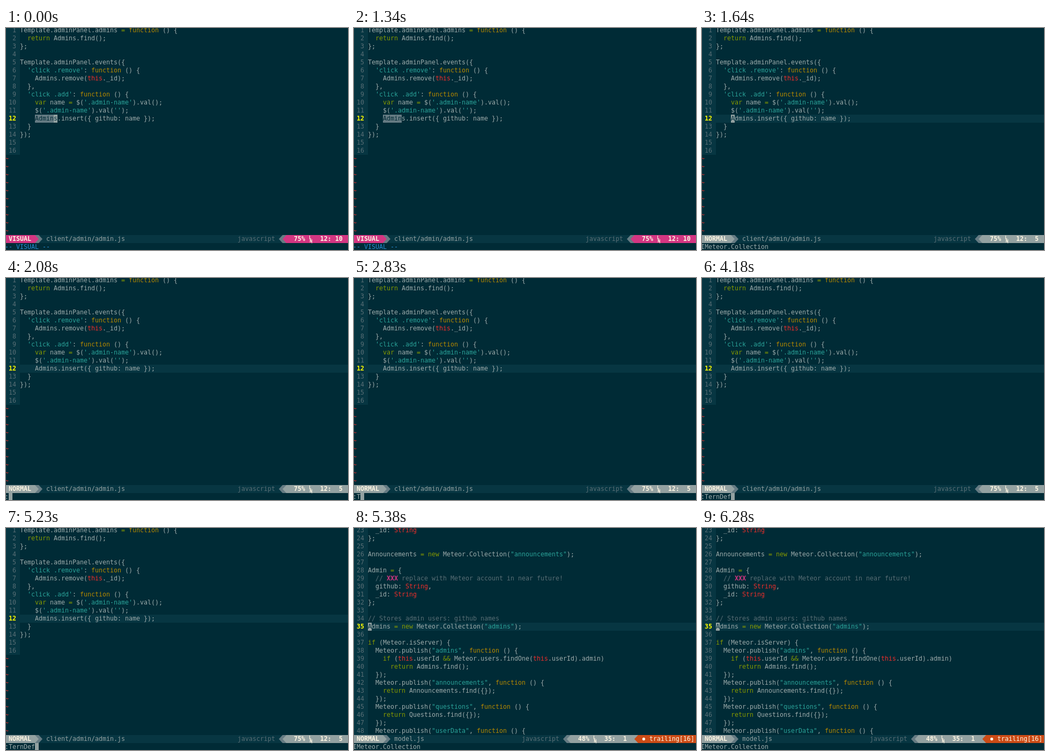
An HTML page with a canvas for the animation above (8.1 s loop, 638 px wide and 415 px high).

```html
<!DOCTYPE html>
<html lang="en">
<head>
<meta charset="utf-8">
<title>Jump to definition</title>
<style>
  html, body { margin: 0; width: 100%; height: 100%; overflow: hidden; background: #002b36; }
  canvas { display: block; }
</style>
</head>
<body>
<canvas id="stage" width="638" height="415"></canvas>
<script>
const ctx = document.getElementById('stage').getContext('2d');

const LOOP = 8100, WIDTH = 638;
const CELL_W = 7, CELL_H = 15, LEFT = -2, TOP = -3, BASELINE = 11;
const GUTTER = 4, STATUS_ROW = 26, COMMAND_ROW = 27;

const C = {
  bg: '#002b36', panel: '#073642', dim: '#586e75', mid: '#657b83', text: '#9dabab',
  light: '#93a1a1', white: '#fdf6e3', yellow: '#b58900', orange: '#cb4b16', red: '#ee2e2b',
  magenta: '#d33682', blue: '#268bd2', cyan: '#2aa198', green: '#859900', current: '#ffff00'
};

const adminFile = {
  name: 'client/admin/admin.js', first: 1, current: 12, percent: '75%', statusCol: 62,
  lines: `Template.adminPanel.admins = function () {
  return Admins.find();
};

Template.adminPanel.events({
  'click .remove': function () {
    Admins.remove(this._id);
  },
  'click .add': function () {
    var name = $('.admin-name').val();
    $('.admin-name').val('');
    Admins.insert({ github: name });
  }
});

`.split('\n')
};

const modelFile = {
  name: 'model.js', first: 23, current: 35, percent: '48%', statusCol: 45, warning: 'trailing[16]',
  lines: `  _id: String
};

Announcements = new Meteor.Collection("announcements");

Admin = {
  // XXX replace with Meteor account in near future!
  github: String,
  _id: String
};

// Stores admin users: github names
Admins = new Meteor.Collection("admins");

if (Meteor.isServer) {
  Meteor.publish("admins", function () {
    if (this.userId && Meteor.users.findOne(this.userId).admin)
      return Admins.find();
  });
  Meteor.publish("announcements", function () {
    return Announcements.find({});
  });
  Meteor.publish("questions", function () {
    return Questions.find({});
  });
  Meteor.publish("userData", function () {`.split('\n')
};

const TOKENS = /\bXXX\b|\/\/ ?|'[^']*'|"[^"]*"|\b(?:function|this|String|var|return|new|if)\b|&&|=|[^\s]/g;

const cellX = col => LEFT + col * CELL_W;
const cellY = row => TOP + row * CELL_H;

function fillCells(col, row, count, color) {
  ctx.fillStyle = color;
  ctx.fillRect(cellX(col), cellY(row), count * CELL_W, CELL_H);
}

function fillRow(col, row, color) {
  ctx.fillStyle = color;
  ctx.fillRect(cellX(col), cellY(row), WIDTH - cellX(col), CELL_H);
}

function write(text, col, row, color, bold = false) {
  ctx.font = `${bold ? 'bold ' : ''}11.63px "DejaVu Sans Mono", monospace`;
  ctx.fillStyle = color;
  [...text].forEach((char, i) => {
    if (char !== ' ') ctx.fillText(char, cellX(col + i), cellY(row) + BASELINE);
  });
}

function drawCursor(col, row, char = ' ') {
  fillCells(col, row, 1, C.light);
  write(char, col, row, C.panel);
}

function tokenColor(token) {
  if (/^['"]/.test(token)) return C.cyan;
  if (token === 'function') return C.yellow;
  if (/^(this|String)$/.test(token)) return C.red;
  if (/^(var|return|new|if|&&|=)$/.test(token)) return C.green;
  return C.text;
}

function drawCode(line, row) {
  const isComment = line.trim().startsWith('//');
  if (isComment) {
    write(line.replace('XXX', '   '), GUTTER, row, C.dim);
    const mark = line.indexOf('XXX');
    if (mark >= 0) write('XXX', GUTTER + mark, row, C.magenta, true);
    return;
  }
  for (const match of line.matchAll(TOKENS))
    write(match[0], GUTTER + match.index, row, tokenColor(match[0]));
}

function drawFile(file, highlightLine) {
  file.lines.forEach((line, row) => {
    const number = file.first + row, isCurrent = number === file.current;
    fillCells(0, row, GUTTER, C.panel);
    if (isCurrent && highlightLine) fillRow(GUTTER, row, C.panel);
    write(String(number).padStart(3), 0, row, isCurrent ? C.current : C.dim, isCurrent);
    drawCode(line, row);
  });
  for (let row = file.lines.length; row < STATUS_ROW; row++) write('~', 0, row, C.red);
}

// Powerline separator: a triangle filling one cell, pointing right (1) or left (-1).
function drawArrow(col, direction, color, behind) {
  fillCells(col, STATUS_ROW, 1, behind);
  const base = cellX(direction > 0 ? col : col + 1), y = cellY(STATUS_ROW);
  ctx.fillStyle = color;
  ctx.beginPath();
  ctx.moveTo(base, y);
  ctx.lineTo(base + direction * CELL_W, y + CELL_H / 2);
  ctx.lineTo(base, y + CELL_H);
  ctx.fill();
}

// The small stacked "LN" glyph of the status line.
function drawLineSymbol(col) {
  const x = cellX(col), y = cellY(STATUS_ROW);
  ctx.strokeStyle = C.white;
  ctx.lineWidth = 1.1;
  ctx.stroke(new Path2D(`M${x + 1.5} ${y + 1}v6h3M${x + 2.5} ${y + 14}v-6l3 6v-6`));
}

function drawStatus(file, mode, modeColor, position) {
  const row = STATUS_ROW, right = file.statusCol + 12;
  fillRow(0, row, C.panel);
  fillCells(0, row, 8, modeColor);
  write(mode, 1, row, C.white, true);
  drawArrow(8, 1, modeColor, C.mid);
  drawArrow(9, 1, C.mid, C.panel);
  write(file.name, 11, row, C.light);

  write('javascript', file.statusCol, row, C.dim);
  drawArrow(right - 1, -1, C.mid, C.panel);
  fillRow(right + 1, row, modeColor);
  drawArrow(right, -1, modeColor, C.mid);
  write(file.percent, right + 3, row, C.white, true);
  drawLineSymbol(right + 7);
  write(position, right + 10, row, C.white, true);

  if (file.warning) {
    const col = right + 18;
    fillRow(col + 1, row, C.orange);
    drawArrow(col, -1, C.orange, modeColor);
    ctx.fillStyle = C.white;
    ctx.beginPath();
    ctx.arc(cellX(col + 2) + 3.5, cellY(row) + 7.5, 2.7, 0, 2 * Math.PI);
    ctx.fill();
    write(file.warning, col + 4, row, C.white);
  }
}

const within = (t, start, end) => t >= start && t < end;

function drawVisual(t) {
  drawFile(adminFile, false);
  fillCells(8, 11, 5, C.mid);
  write('Admin', 8, 11, C.bg);
  if (!within(t, 600, 890) && !within(t, 1340, 1490)) drawCursor(13, 11, 's');
  drawStatus(adminFile, 'VISUAL', C.magenta, '12: 10');
  write('-- VISUAL --', 0, COMMAND_ROW, C.blue);
}

const KEY_TIMES = [2830, 2980, 3130, 3280, 3880, 4180, 4180];

function drawNormal(t) {
  drawFile(adminFile, true);
  drawStatus(adminFile, 'NORMAL', C.light, '12:  5');
  if (t < 2080) {
    drawCursor(8, 11, 'A');
    write('IMeteor.Collection', 0, COMMAND_ROW, C.text);
    return;
  }
  const typed = ':' + 'TernDef'.slice(0, KEY_TIMES.filter(time => time <= t).length);
  write(typed, 0, COMMAND_ROW, C.text);
  if (!within(t, 4930, 5230)) drawCursor(typed.length, COMMAND_ROW);
}

function drawDefinition(t) {
  drawFile(modelFile, true);
  if (!within(t, 5980, 6280)) drawCursor(GUTTER, 12, 'A');
  drawStatus(modelFile, 'NORMAL', C.light, '35:  1');
  write('IMeteor.Collection', 0, COMMAND_ROW, C.text);
}

function draw(t) {
  ctx.fillStyle = C.bg;
  ctx.fillRect(0, 0, WIDTH, 415);
  if (t < 1640) drawVisual(t);
  else if (t < 5380) drawNormal(t);
  else drawDefinition(t);
}

const start = performance.now();
function tick() {
  draw((performance.now() - start) % LOOP);
  requestAnimationFrame(tick);
}
tick();
</script>
</body>
</html>
```
